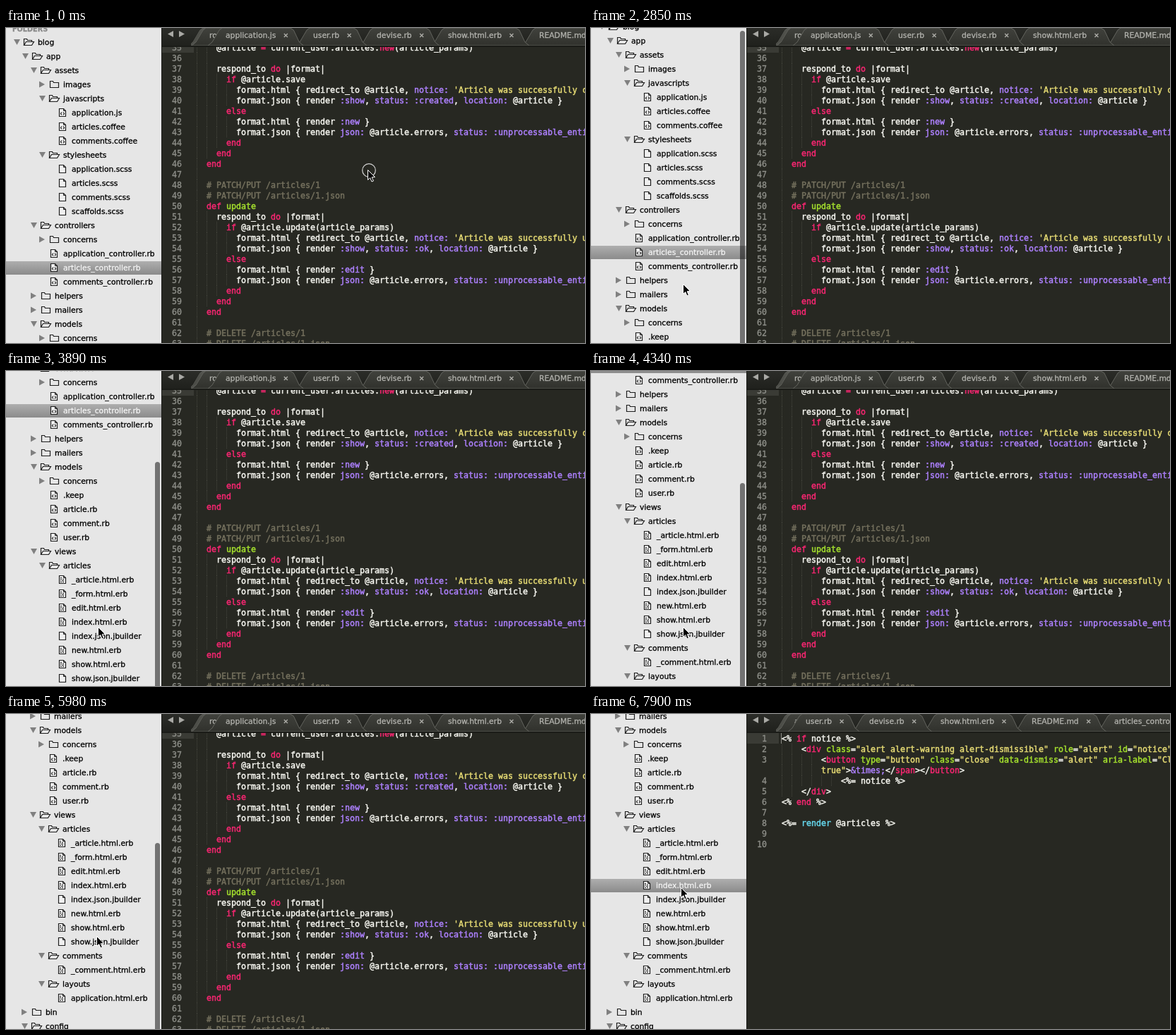
An HTML page with a canvas that plays this animation: 820 px wide and 447 px high, repeating every 8 s.

```html
<!DOCTYPE html>
<html lang="en">
<head>
<meta charset="utf-8">
<title>Code editor</title>
<style>
html, body { margin: 0; width: 820px; height: 447px; overflow: hidden; background: #272822; }
canvas { display: block; }
</style>
</head>
<body>
<canvas id="stage" width="820" height="447"></canvas>
<script>
const ctx = document.getElementById('stage').getContext('2d');
const LOOP = 8000, SIDE = 220, BAR = 27;
const UI = '10.75px "DejaVu Sans", sans-serif';
const MONO = '11.63px "DejaVu Sans Mono", monospace';
const PINK = '#f92672', PURPLE = '#ae81ff', GREEN = '#a6e22e', YELLOW = '#e6db74', CYAN = '#66d9ef';

// Depth by indentation; "/" marks an open folder, "+" a closed one.
const tree = `blog/
 app/
  assets/
   images+
   javascripts/
    application.js
    articles.coffee
    comments.coffee
   stylesheets/
    application.scss
    articles.scss
    comments.scss
    scaffolds.scss
  controllers/
   concerns+
   application_controller.rb
   articles_controller.rb
   comments_controller.rb
  helpers+
  mailers+
  models/
   concerns+
   .keep
   article.rb
   comment.rb
   user.rb
  views/
   articles/
    _article.html.erb
    _form.html.erb
    edit.html.erb
    index.html.erb
    index.json.jbuilder
    new.html.erb
    show.html.erb
    show.json.jbuilder
   comments/
    _comment.html.erb
   layouts/
    application.html.erb
 bin+
 config/`.split('\n').map(line => {
  const name = line.trim();
  return { depth: line.length - name.length, name: name.replace(/[+/]$/, ''),
    open: name.endsWith('/'), closed: name.endsWith('+') };
});

const ruby = {
  first: 35, top: 20,
  rules: /(#.*)|('[^']*'?)|(:\w+|\w+:)|\b(do|if|else|end|def|new)\b|(=)|((?<=def )\w+)/g,
  colors: ['#75715e', YELLOW, PURPLE, PINK, PINK, GREEN],
  lines: `    @article = current_user.articles.new(article_params)

    respond_to do |format|
      if @article.save
        format.html { redirect_to @article, notice: 'Article was successfully created.' }
        format.json { render :show, status: :created, location: @article }
      else
        format.html { render :new }
        format.json { render json: @article.errors, status: :unprocessable_entity }
      end
    end
  end

  # PATCH/PUT /articles/1
  # PATCH/PUT /articles/1.json
  def update
    respond_to do |format|
      if @article.update(article_params)
        format.html { redirect_to @article, notice: 'Article was successfully updated.' }
        format.json { render :show, status: :ok, location: @article }
      else
        format.html { render :edit }
        format.json { render json: @article.errors, status: :unprocessable_entity }
      end
    end
  end

  # DELETE /articles/1
  # DELETE /articles/1.json`.split('\n')
};

// "~" marks a soft-wrapped line without a number.
const erb = {
  first: 1, top: 27,
  rules: /(^ *true"|"[^"]*"?)|(&\w+;)|((?<=<\/?)\w+)|([\w-]+(?=="))|\b(if|end)\b|\b(render)\b/g,
  colors: [YELLOW, PURPLE, PINK, GREEN, PINK, CYAN],
  lines: `<% if notice %>
    <div class="alert alert-warning alert-dismissible" role="alert" id="notice">
        <button type="button" class="close" data-dismiss="alert" aria-label="Close">
~        true">&times;</span></button>
            <%= notice %>
    </div>
<% end %>

<%= render @articles %>

`.split('\n')
};

const tabs = [['routes.rb', 221], ['application.js', 311], ['user.rb', 435], ['devise.rb', 525],
  ['show.html.erb', 626], ['README.md', 755], ['articles_controller.rb', 872]];

// Tracks: [time, values...]
const pointer = [[0, 512, 201], [150, 531, 257], [300, 531, 257], [450, 535, 215], [750, 549, 85],
  [900, 546, 35], [1050, 539, 5], [1200, 539, 5], [1350, 250, 150], [1500, 46, 259], [1650, 46, 259],
  [1800, 46, 257], [2550, 130, 363], [5840, 130, 363], [5980, 128, 315], [6430, 127, 246]];
const scroll = [[2700, 0], [2850, 22], [3150, 133], [3300, 186], [3450, 227], [3600, 257], [3750, 275],
  [3890, 284], [4040, 302], [4340, 347], [4640, 347], [4790, 365], [4940, 387], [5090, 397]];

function at(track, t) {
  const i = track.findIndex(k => k[0] > t);
  if (i < 0) return track.at(-1).slice(1);
  if (i === 0) return track[0].slice(1);
  const a = track[i - 1], b = track[i], f = (t - a[0]) / (b[0] - a[0]);
  return a.slice(1).map((v, j) => Math.round(v + (b[j + 1] - v) * f));
}

function step(t) {
  const base = [0, 3890, 5980, 7010].findLast(b => b <= t);
  return base + Math.floor((t - base) / 150) * 150;
}

function rect(x, y, w, h, fill) {
  ctx.fillStyle = fill;
  ctx.fillRect(x, y, w, h);
}

// The thin stroke gives the text its heavier, smoothed look.
function text(str, x, y, color, font = UI, align = 'left', weight = .3) {
  ctx.font = font;
  ctx.textAlign = align;
  ctx.fillStyle = ctx.strokeStyle = color;
  ctx.lineWidth = weight;
  ctx.lineJoin = 'round';
  ctx.fillText(str, x, y);
  ctx.strokeText(str, x, y);
  ctx.lineJoin = 'miter';
}

function shape(points, fill, stroke, width = 1, close = true) {
  ctx.beginPath();
  points.forEach(([x, y]) => ctx.lineTo(x, y));
  if (close) ctx.closePath();
  if (fill) { ctx.fillStyle = fill; ctx.fill(); }
  if (stroke) { ctx.strokeStyle = stroke; ctx.lineWidth = width; ctx.stroke(); }
}

function vGradient(y0, y1, a, b) {
  const g = ctx.createLinearGradient(0, y0, 0, y1);
  g.addColorStop(0, a);
  g.addColorStop(1, b);
  return g;
}

function clipped(x, y, w, h, draw) {
  ctx.save();
  ctx.beginPath();
  ctx.rect(x, y, w, h);
  ctx.clip();
  draw();
  ctx.restore();
}

function drawIcon(row, x, y) {
  const ink = '#1e1e1e';
  ctx.save();
  ctx.translate(x + .5, y + .5);
  if (row.open) {
    shape([[0, 4], [0, -5], [4, -5], [5, -3], [11, -3], [11, -1]], null, ink, 1.2, false);
    shape([[0, 4], [3, -1], [14, -1], [11, 4]], null, ink, 1.2);
  } else if (row.closed) {
    shape([[1, 4], [1, -5], [5, -5], [6, -3], [13, -3], [13, 4]], null, ink, 1.2);
  } else {
    shape([[2, 5], [2, -6], [8, -6], [11, -3], [11, 5]], '#f0f0f0', ink, 1.2);
    shape([[8, -6], [8, -3], [11, -3]], null, ink, 1, false);
    if (/erb$/.test(row.name)) {
      for (const [px, py, w] of [[4, -3, 2], [4, -1, 2], [7, -1, 2], [4, 1, 1], [6, 1, 3], [4, 3, 2], [7, 3, 2]])
        rect(px - .5, py - .5, w, 1, ink);
    } else if (/(rb|js|coffee|keep)$/.test(row.name)) {
      shape([[5.5, -1], [4, 1], [5.5, 3]], null, ink, 1.2, false);
      shape([[7.5, -1], [9, 1], [7.5, 3]], null, ink, 1.2, false);
    }
  }
  ctx.restore();
}

function drawSidebar(t, offset) {
  const left = t >= 5090 ? -1 : 0;
  const selected = t >= 6880 ? 'index.html.erb' : 'articles_controller.rb';
  rect(0, 0, SIDE, 447, '#e6e6e6');
  text('FOLDERS', 9 + left, 5 - offset, '#8a8a8a', 'bold 9.7px "DejaVu Sans", sans-serif');
  tree.forEach((row, i) => {
    const y = 20 * (i + 1) - offset, x = 12 * row.depth + left, on = row.name === selected;
    if (y < -12 || y > 460) return;
    if (on) rect(0, y - 9, SIDE, 19, vGradient(y - 9, y + 10, '#aeaeae', '#8b8b8b'));
    if (row.open) shape([[x + 11, y - 4], [x + 20, y - 4], [x + 15.5, y + 4]], '#808080');
    if (row.closed) shape([[x + 11, y - 4.5], [x + 19, y], [x + 11, y + 4.5]], '#808080');
    drawIcon(row, x + 25, y);
    text(row.name, x + 45, y + 4, on ? '#f4f4f4' : '#000');
  });
  if (t >= 2850 && t < 6280) {
    ctx.fillStyle = 'rgba(0, 0, 0, .5)';
    ctx.beginPath();
    ctx.roundRect(211, Math.round(57 + (offset - 133) * .477), 7, 500, 3.5);
    ctx.fill();
  }
}

function drawLine(line, x, y, { rules, colors }) {
  let col = 0;
  const put = (str, color) => {
    text(str, x + col * 7, y, color, MONO, 'left', .45);
    col += str.length;
  };
  for (const m of line.matchAll(rules)) {
    put(line.slice(col, m.index), '#f8f8f2');
    put(m[0], colors[m.slice(1).findIndex(g => g !== undefined)]);
  }
  put(line.slice(col), '#f8f8f2');
}

function drawCode(doc) {
  let no = doc.first, indent = 0;
  rect(SIDE + 1, doc.top, 45, 15, '#3a3b35');
  doc.lines.forEach((raw, i) => {
    const y = doc.top + i * 15, line = raw.replace('~', '');
    if (line) indent = line.search(/\S/);
    for (let c = 0; c < indent; c += 2)
      for (let d = 0; d < 15; d += 2) rect(270 + c * 7, y + d, 1, 1, '#45463e');
    if (line === raw) text(no++, 249, y + 12, '#8f908a', MONO, 'right');
    drawLine(line, 270, y + 12, doc);
  });
}

function drawTab(name, x) {
  ctx.font = UI;
  const cross = x + ctx.measureText(name).width + 14;
  shape([[x - 25, 25], [x - 19, 20], [x - 9, 3], [x - 5, 0], [cross + 6, 0], [cross + 11, 3],
    [cross + 19, 20], [cross + 25, 25]], vGradient(0, 25, '#40413c', '#31322d'), '#63645e');
  text(name, x, 14, '#b4b4af');
  shape([[cross - 2.5, 8], [cross + 2.5, 13]], null, '#aaaaa5', 1.4);
  shape([[cross + 2.5, 8], [cross - 2.5, 13]], null, '#aaaaa5', 1.4);
}

// Tabs scrolled past the left edge pile up beneath the first free one.
function drawTabs(shift) {
  const placed = tabs.map(([name, x]) => [name, x - shift]);
  const free = placed.filter(p => p[1] >= 300);
  const piled = placed.filter(p => p[1] < 300);
  rect(SIDE, 0, 600, BAR, vGradient(0, BAR, '#2b2c28', '#1f201c'));
  clipped(262, 0, free[0][1] - 262, BAR, () => {
    for (let i = 0; i < 3; i++) drawTab('', 284 + i * 2);
    drawTab(piled.at(-1)[0], 288);
  });
  clipped(262, 0, 558, BAR, () => free.reverse().forEach(p => drawTab(...p)));
  shape([[229, 8.5], [237, 4], [237, 13]], '#a9a9a5');
  shape([[253, 8.5], [245, 4], [245, 13]], '#a9a9a5');
  rect(SIDE, 25, 600, 2, '#1b1c18');
}

function drawPointer(x, y, pressed) {
  ctx.save();
  ctx.translate(x, y);
  if (pressed) {
    ctx.beginPath();
    ctx.arc(2, 1, 9.3, 0, 7);
    ctx.strokeStyle = '#d5d5d5';
    ctx.lineWidth = 1.2;
    ctx.stroke();
  }
  shape([[.5, .5], [.5, 14.5], [3.7, 11.6], [6, 17], [8.4, 16], [6.1, 10.8], [10.5, 10.5]], '#000', '#fff');
  ctx.restore();
}

function draw(now) {
  const raw = now % LOOP, t = step(raw);
  const opened = t >= 7010;
  rect(0, 0, 820, 447, '#272822');
  clipped(SIDE, BAR, 600, 420, () => drawCode(opened ? erb : ruby));
  if (opened) {
    ctx.globalAlpha = raw < 7450 ? 1 : raw < 7600 ? .5 : raw < 7900 ? 0 : .5;
    rect(269, 27, 1, 15, '#f8f8f0');
    ctx.globalAlpha = 1;
  }
  drawTabs(t >= 7160 ? 131 : opened ? 65 : 0);
  clipped(0, 0, SIDE, 447, () => drawSidebar(t, at(scroll, t)[0]));
  rect(SIDE, 0, 1, 447, '#1c1d19');
  drawPointer(...at(pointer, t), t < 150 || (t >= 6880 && t < 7160));
  requestAnimationFrame(tick);
}

let start;
function tick(now) {
  start ??= now;
  draw(now - start);
}
requestAnimationFrame(tick);
</script>
</body>
</html>
```
